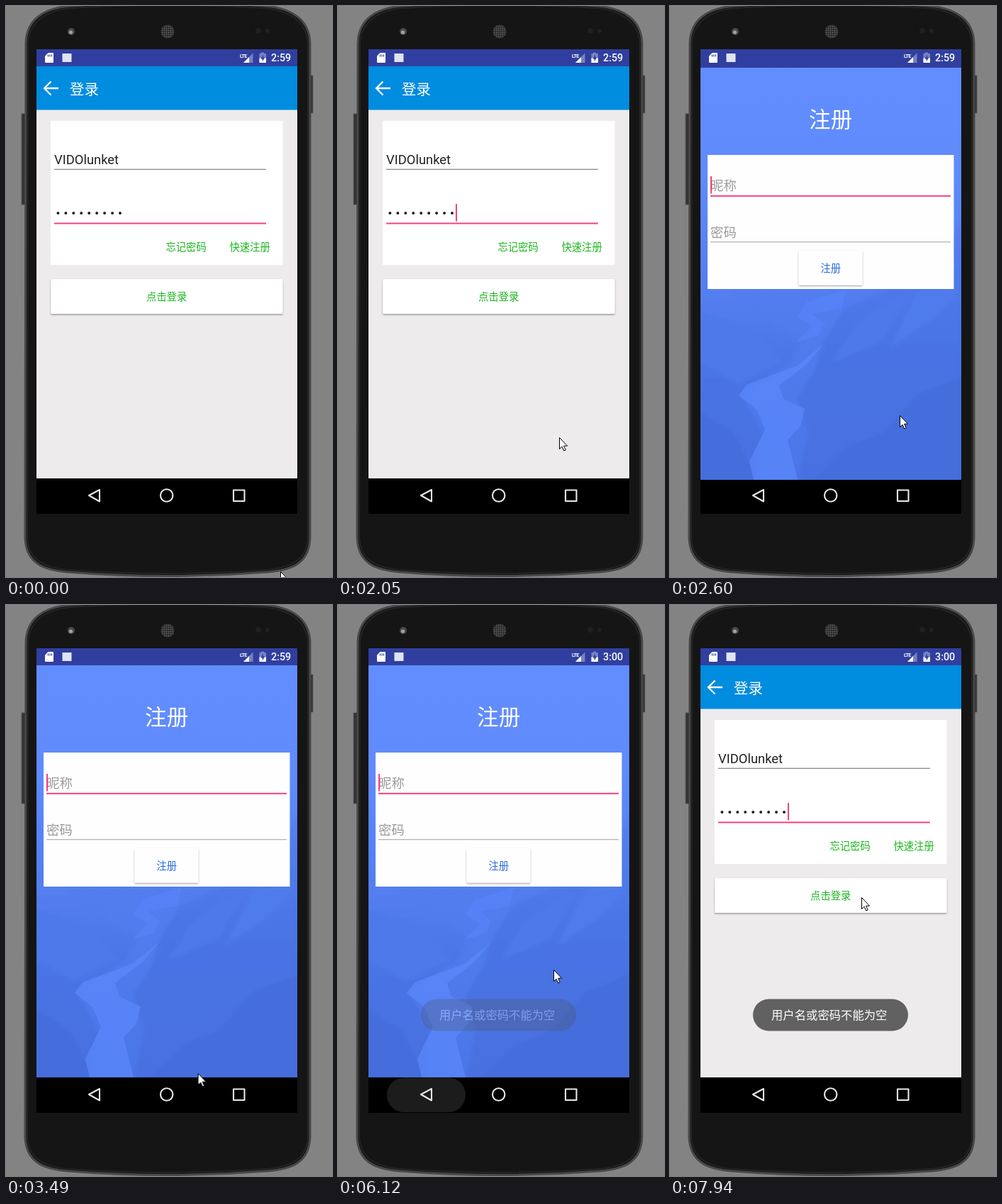
Write an HTML page that moves like this. It is 460 px wide and 805 px high and loops after 8000 ms.

```html
<!DOCTYPE html>
<html lang="zh">
<head>
<meta charset="utf-8">
<title>登录</title>
<style>
  html, body { margin: 0; width: 100%; height: 100%; overflow: hidden; background: #838383; }
  svg { display: block; width: 460px; height: 805px; }
  text { font-family: "Noto Sans CJK SC", "Noto Sans CJK", "Noto Sans", sans-serif; }
  .latin { font-family: Roboto, sans-serif; }
  .mid { text-anchor: middle; }
  .small { font-size: 14.3px; }
  .field { font-size: 18.4px; }
  .hint { fill: #9a9a9e; }
  .green { fill: #1bb51f; }
  .pink { fill: #f5407f; }

  .anim { animation: 8s linear infinite; }
  .step { animation: 8s step-end infinite; }
  #pointer { animation-name: pointer; }
  #register { animation-name: register; }
  #toast { animation-name: toast; }
  #ripple { animation-name: ripple; }
  #loginCaret { animation-name: loginCaret; }
  #nameCaret { animation-name: nameCaret; }
  #before { animation-name: before; }
  #after { animation-name: after; }

  @keyframes pointer {
    0%, .875% { transform: translate(387px, 797px); animation-timing-function: ease-in-out; }
    10%, 17.875% { transform: translate(339px, 342px); }
    25.625%, 29.49% { transform: translate(312px, 608px); }
    29.5%, 35.625% { transform: translate(324px, 577px); }
    45.375%, 50.25% { transform: translate(259px, 678px); }
    55.375%, 56% { transform: translate(145px, 672px); }
    57.5%, 59.25% { transform: translate(132px, 686px); }
    60.5%, 72.375% { transform: translate(126px, 688px); }
    76.5%, 77.4% { transform: translate(304px, 514px); }
    81.375%, 82.5% { transform: translate(300px, 400px); }
    86.75%, 87.5% { transform: translate(280px, 294px); }
    90.375%, 92.5% { transform: translate(265px, 262px); }
    94.375% { transform: translate(254px, 310px); }
    96.25%, 97.5% { transform: translate(277px, 368px); }
    99.25%, 100% { transform: translate(270px, 412px); }
  }
  @keyframes register {
    0%, 29.49% { opacity: 0; transform: translateY(52px); }
    29.5% { opacity: .3; transform: translateY(28px); }
    31.5% { opacity: 1; transform: translateY(5px); }
    32.5%, 33.6% { opacity: 1; transform: translateY(2px); }
    33.625%, 83.5% { opacity: 1; transform: none; }
    85.5% { opacity: 1; transform: translateY(3px); }
    86.75%, 87.5% { opacity: .6; transform: translateY(10px); }
    88.6%, 100% { opacity: 0; transform: translateY(40px); }
  }
  @keyframes toast {
    0%, 75% { opacity: 0; }
    76.5%, 77.4% { opacity: .3; }
    81%, 100% { opacity: 1; }
  }
  @keyframes ripple {
    0%, 72.5% { opacity: 0; }
    74.5% { opacity: .16; }
    76.5%, 77.4% { opacity: .11; }
    81%, 100% { opacity: 0; }
  }
  @keyframes loginCaret {
    0%, 10%, 82% { opacity: 0; }
    3.75%, 19.4%, 89.5%, 100% { opacity: 1; }
  }
  @keyframes nameCaret {
    0%, 41.2%, 53.5%, 66.25%, 76.3%, 100% { opacity: 1; }
    35.625%, 47.2%, 59.9%, 72.5% { opacity: 0; }
  }
  @keyframes before { 0% { opacity: 1; } 46.625%, 100% { opacity: 0; } }
  @keyframes after { 0% { opacity: 0; } 46.625%, 100% { opacity: 1; } }
</style>
</head>
<body>
<svg viewBox="0 0 460 805">
  <defs>
    <clipPath id="screen"><path d="M43 61H411V716H43Z"/></clipPath>
    <clipPath id="page"><path d="M43 85H411V666H43Z"/></clipPath>
    <linearGradient id="sky" x2="0" y2="1">
      <stop offset="0" stop-color="#628dff"/>
      <stop offset=".25" stop-color="#608bfd"/>
      <stop offset=".52" stop-color="#527eef"/>
      <stop offset="1" stop-color="#4b76e8"/>
    </linearGradient>
    <linearGradient id="slope" x2="0" y2="1">
      <stop offset="0" stop-color="#5680f2"/>
      <stop offset=".5" stop-color="#4873e4"/>
      <stop offset="1" stop-color="#4870e0"/>
    </linearGradient>
    <filter id="soft"><feGaussianBlur stdDeviation="2.5"/></filter>
    <filter id="shadow" x="-5%" y="-20%" width="110%" height="150%">
      <feDropShadow dx="0" dy="1.3" stdDeviation="1" flood-opacity=".38"/>
    </filter>
    <pattern id="mesh" width="3" height="3" patternUnits="userSpaceOnUse">
      <circle cx="1.5" cy="1.5" r="1" fill="#606060"/>
    </pattern>
  </defs>

  <!-- phone -->
  <rect width="460" height="805" fill="#838383"/>
  <path d="M22 152H28V280H22Z M428 98H433V151H428Z" fill="#343434" stroke="#555" stroke-width=".8"/>
  <path d="M28 52C29 20 52 3 90 0Q228 -9 366 0C404 3 428 20 429 52V750C428 785 405 795 370 798Q228 809 86 798C52 795 28 785 27 750Z"
        fill="#151515" stroke="#484848" stroke-width="3"/>
  <path d="M31 54C32 24 54 7 90 3Q228 -6 366 3C402 7 425 24 426 54V749C425 781 403 791 370 795Q228 805 86 795C54 791 31 781 30 749Z"
        fill="none" stroke="#242424" stroke-width="2"/>
  <circle cx="92" cy="36" r="5" fill="#4b4b4b"/>
  <circle cx="91.5" cy="37" r="2.6" fill="#a0a0a0"/>
  <circle cx="228" cy="36" r="9.5" fill="#282828"/>
  <circle cx="228" cy="36" r="9.5" fill="url(#mesh)"/>
  <circle cx="356" cy="35" r="4" fill="#202020"/>
  <circle cx="369" cy="35" r="3" fill="#202020"/>

  <g clip-path="url(#screen)">
    <rect x="43" y="61" width="368" height="655"/>

    <!-- login -->
    <rect x="43" y="61" width="368" height="24" fill="#303f9f"/>
    <rect x="43" y="85" width="368" height="581" fill="#edebec"/>
    <rect x="43" y="85" width="368" height="61.5" fill="#008cdf"/>
    <path d="M74 116H55M63.5 106.5L54 116L63.5 125.5" fill="none" stroke="#fff" stroke-width="2.3"/>
    <text x="90" y="125.3" font-size="20.4" fill="#fff">登录</text>
    <rect x="63" y="162" width="327.5" height="203" fill="#fff"/>
    <text class="latin field" x="68" y="222.5" fill="#212121">VIDOlunket</text>
    <rect x="68" y="229.7" width="299" height="1.2" fill="#808080"/>
    <path d="M73.4 292H162" stroke="#212121" stroke-width="4" stroke-linecap="round" stroke-dasharray="0 10.95"/>
    <rect class="pink" x="68" y="305.5" width="299" height="2"/>
    <rect class="pink step" id="loginCaret" x="166" y="279" width="2" height="24.5"/>
    <g class="small green">
      <text x="225.5" y="345">忘记密码</text>
      <text x="315.5" y="345">快速注册</text>
    </g>
    <rect x="63" y="385" width="327.5" height="49" rx="1.5" fill="#fff" filter="url(#shadow)"/>
    <text class="small green mid" x="226.7" y="415.3">点击登录</text>

    <!-- register -->
    <g id="register" class="anim">
      <rect x="43" y="666" width="368" height="60"/>
      <rect x="43" y="61" width="368" height="24" fill="#303f9f"/>
      <g clip-path="url(#page)">
        <rect x="43" y="85" width="368" height="581" fill="url(#sky)"/>
        <g filter="url(#soft)">
          <path d="M40 385L80 398L140 440L185 470L170 500L100 545L130 600L120 670H40Z" fill="url(#slope)"/>
          <path d="M415 290L385 350L300 400L245 425L215 475L205 510L180 550L195 600L180 670H415Z" fill="url(#slope)"/>
          <path d="M43 430L110 450L160 500L95 530L43 500Z M300 420L340 400L300 470L230 500L260 450Z" fill="#4d79ea"/>
          <path d="M415 520L350 545L300 600L250 620L200 670H415Z M43 570L90 600L125 670H43Z" fill="#446ddc"/>
          <path d="M411 395L370 440L310 480L350 400Z" fill="#507bec"/>
        </g>
        <path d="M192 416L248 398L242 424L200 432L216 445L210 462L178 472L200 450L180 436Z" fill="#5684f8" opacity=".75"/>
        <path d="M217 474L193 503L154 533L160 552L190 566L184 590L166 610L180 666H118L112 640L134 595L122 567L97 547L108 532L180 505Z" fill="#5a87fb" opacity=".75"/>
      </g>
      <text class="mid" x="226.7" y="169.3" font-size="30.6" fill="#fff">注册</text>
      <rect x="53" y="208" width="347.5" height="189" fill="#fefefe"/>
      <text class="field hint" x="57" y="257.6">昵称</text>
      <rect class="pink" x="57" y="264.8" width="339" height="2"/>
      <rect class="pink step" id="nameCaret" x="57" y="238" width="2" height="24.5"/>
      <text class="field hint" x="57" y="323.6">密码</text>
      <rect x="57" y="330" width="339" height="1.3" fill="#b4b4b6"/>
      <rect x="181.5" y="343" width="90" height="48.5" rx="1.5" fill="#fefefe" filter="url(#shadow)"/>
      <text class="small mid" x="226.7" y="373" fill="#2a6be0">注册</text>
    </g>

    <!-- navigation keys -->
    <rect class="anim" id="ripple" x="69" y="666.5" width="111" height="48.5" rx="24" fill="#fff" opacity="0"/>
    <g fill="none" stroke="#e8e8e8" stroke-width="2.1" stroke-linejoin="round">
      <path d="M117 690L132 682V698.5Z"/>
      <circle cx="226.7" cy="690" r="8.7"/>
      <path d="M321 682.5H336.5V698H321Z"/>
    </g>

    <g class="anim" id="toast">
      <rect x="117" y="555.5" width="219" height="45" rx="22.5" fill="#535353" fill-opacity=".9"/>
      <text x="143" y="584.2" font-size="16.35" fill="#fff">用户名或密码不能为空</text>
    </g>

    <!-- status icons -->
    <g fill="#fff">
      <path d="M59.5 66H66Q67 66 67 67V79Q67 80 66 80H56Q55 80 55 79V70.5Z"/>
      <path d="M59.5 68.5V71.5M62 68.5V71.5M64.5 68.5V71.5" stroke="#303f9f" stroke-width="1.2"/>
      <rect x="79.5" y="67" width="13" height="12" fill="#dfe3f2"/>
      <text class="latin" x="330" y="72.5" font-size="7" font-weight="700" letter-spacing="-.6">LTE</text>
      <path d="M348.5 66.5V80H335Z" opacity=".35"/>
      <path d="M343 72V80H335Z"/>
      <path d="M360 65.5H364V67H367V80H357.5V67H360Z" opacity=".35"/>
      <path d="M357.5 73.5H367V80H357.5Z"/>
      <path d="M363 68.5L359.5 74.8H361.7V78.5L365.2 72.5H363Z" fill="#303f9f"/>
      <g class="latin" font-size="14.3" font-weight="500">
        <text class="latin step" id="before" x="374" y="78.4">2:59</text>
        <text class="latin step" id="after" x="374" y="78.4">3:00</text>
      </g>
    </g>
  </g>

  <path class="anim" id="pointer" d="M.5 .5V16.6L4.1 13.2L6.7 19L9.2 17.9L6.6 12.2H11.6Z" fill="#fff" stroke="#000"/>
</svg>
</body>
</html>
```
